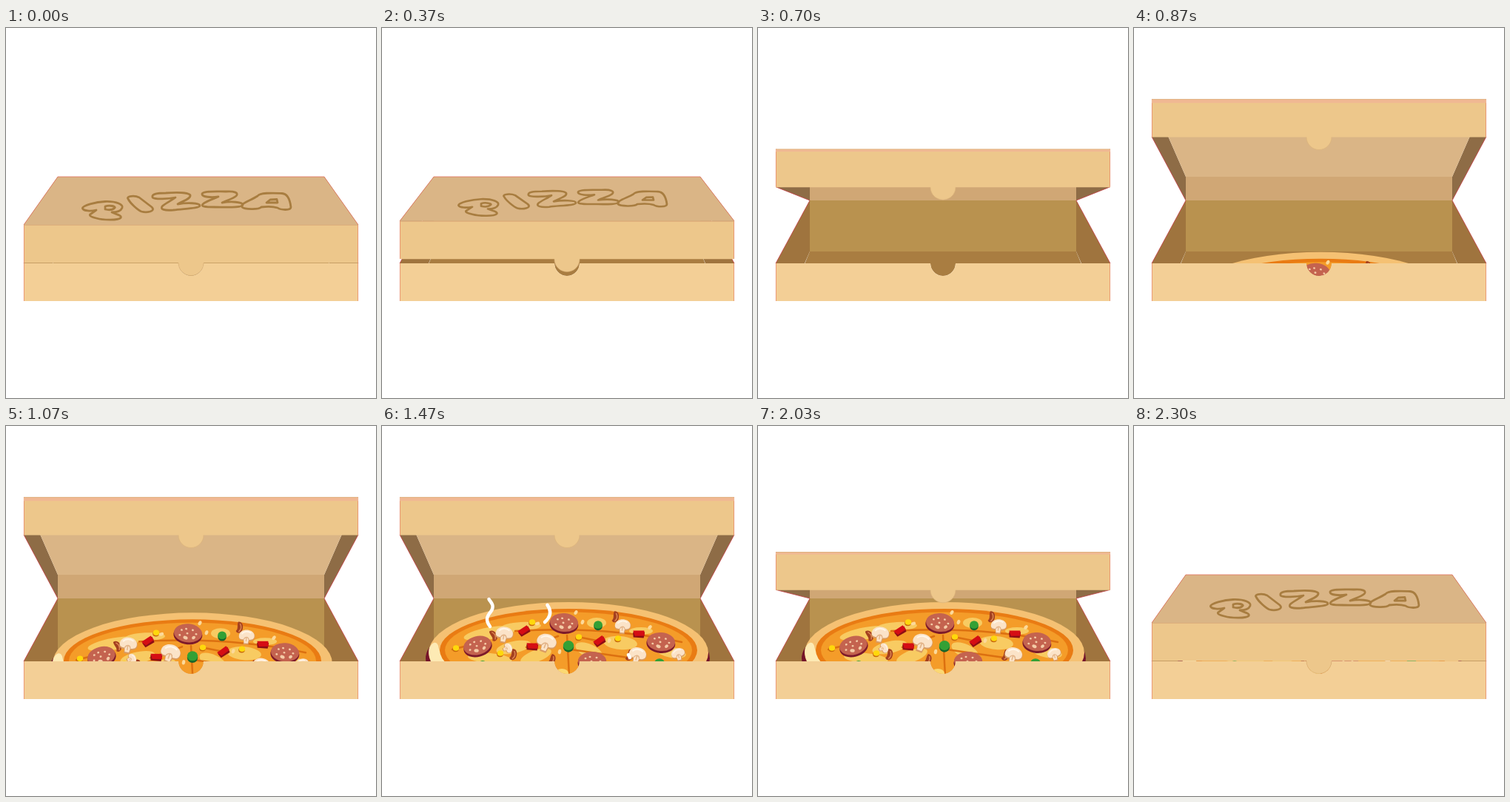
An HTML page for the animation above (2830 ms loop, 500x500 px).

```html
<!DOCTYPE html>
<html lang="en">
<head>
<meta charset="utf-8">
<title>Pizza box</title>
<style>
html, body { margin: 0; width: 100%; height: 100%; overflow: hidden; background: #fff; }
svg { display: block; width: 100vw; height: 100vh; }
</style>
</head>
<body>
<svg id="stage" viewBox="0 0 500 500">
  <defs>
    <clipPath id="inside"><path d="M0 0H500V318H267A17 17 0 0 1 233 318H0Z"/></clipPath>
    <clipPath id="topClip"><path id="topClipPath"/></clipPath>
  </defs>

  <g id="tray">
    <path fill="#b9924f" d="M70 233H430V302H70Z"/>
    <path fill="#a97d41" d="M70 302H430L437 319H63Z"/>
    <path fill="#9f743e" d="M24 318L70 233V302L63 318ZM476 318L430 233V302L437 318Z"/>
    <path fill="none" stroke="#c23a40" stroke-width=".8" d="M24 318L70 233M476 318L430 233"/>
    <path fill="#a97d41" d="M233 317H267V318A17 17 0 0 1 233 318Z"/>
  </g>

  <g clip-path="url(#inside)"><g id="pizza"></g></g>

  <path fill="#f3cf96" d="M24 318H233A17 17 0 0 0 267 318H476V369H24Z"/>
  <path fill="none" stroke="#e8896c" stroke-width=".8" d="M24.4 318V369M475.6 318V369"/>

  <g id="lid">
    <path id="flaps" fill="#8e6c46"/>
    <path id="flapEdges" fill="none" stroke="#c23a40" stroke-width=".8"/>
    <path fill="#d0a775" d="M70 201H430V233H70Z"/>
    <path id="top" fill="#dab586"/>
    <path id="topEdges" fill="none" stroke="#e0705c" stroke-width=".8"/>
    <g clip-path="url(#topClip)">
      <g id="lettering" fill="none" stroke="#a87d40" stroke-width="2.8" stroke-linejoin="round">
        <path d="M103.500 244C102 240 122 235 134 234.500C150 234 159 239 157 243C155 248 148 249 143 249C149 252 157 253 155 256.500C152 260 132 260 122 257C114 255 111 253 115 251L122 246C114 248 105 247 103.500 244ZM134 241C140 239 149 241 147 243C144 246 138 246 134 245Z"/>
        <path d="M165 231C162 227 174 226 180 229L197 242C203 248 190 250 183 248C178 246 168 237 165 231Z"/>
        <path d="M198 229C196 224 205 223 216 223C230 222 247 222 249 226C250 231 238 234 232 238C243 236 262 236 262 240C262 244 240 244 226 246C214 247 208 245 211 241C215 237 224 233 229 229C220 231 201 232 198 229Z"/>
        <path d="M265 224C267 220 284 221 297 221C309 220 315 223 311 227C306 231 298 233 292 236C304 234 320 235 320 239C319 243 300 242 282 242C268 242 263 241 266 238C270 234 280 231 287 228C279 229 264 229 265 224Z"/>
        <path d="M340 227C344 222 360 223 373 223.500C381 224 384 234 385 242C385 247 371 246 367 243C361 241 353 241 345 242C341 246 322 245 319 242C316 237 331 233 340 227ZM357 232L366 231.500L367 236L352 236Z"/>
      </g>
    </g>
    <g id="lidFront">
      <path fill="#edc78b" d="M24 0H476V51.500H267A17 17 0 0 1 233 51.500H24Z"/>
      <path fill="none" stroke="#dcb47a" stroke-width=".7" d="M267 51.500A17 17 0 0 1 233 51.500"/>
      <path fill="none" stroke="#e8896c" stroke-width=".8" d="M24.400 0V51M475.600 0V51"/>
      <path stroke="#d9a577" stroke-width=".8" d="M24 .4H476"/>
      <rect id="rim" x="24" width="452" fill="#f0b893"/>
    </g>
  </g>

  <g id="steam" fill="none" stroke="#fff" stroke-width="4.500" stroke-linecap="round">
    <path pathLength="100" d="M146 271C140 263 141 258 147 251C152 244 149 240 145 235C143 232 144 230 145 229"/>
    <path pathLength="100" d="M220 265C230 256 228 247 222 240C218 235 220 231 222 229"/>
    <path pathLength="100" d="M335 313C329 303 331 298 337 291C344 284 343 279 338 272"/>
  </g>
</svg>
<script>
const LOOP = 2830;
const CLOSED = 266, OPEN = 96, BACK = 201, HINGE = 233, DEPTH = 51;
const $ = id => document.getElementById(id);
const clamp = v => Math.min(1, Math.max(0, v));
const span = (t, start, length) => clamp((t - start) / length);

// Pizza pieces
const ellipse = (x, y, rx, ry, fill, turn = 0) =>
  `<ellipse cx="${x}" cy="${y}" rx="${rx}" ry="${ry}" fill="${fill}" transform="rotate(${turn} ${x} ${y})"/>`;
const place = (x, y, turn, body) => `<g transform="translate(${x} ${y}) rotate(${turn})">${body}</g>`;

const salami = (x, y, turn) => place(x, y, turn,
  ellipse(0, 2, 19.5, 13, "#7d1a2a") + ellipse(0, -.5, 19, 12.5, "#c4634f") +
  [[-9, -4], [-3, -6], [6, -5], [11, 0], [-11, 3], [-1, 0]].map(([a, b]) => ellipse(a, b, 1.5, 1.3, "#f4cba6")).join("") +
  ellipse(-3, 6, 3.2, 2.2, "#f4cba6", 20) + ellipse(8, 5, 2.6, 2, "#f4cba6", -40));

const pepper = (x, y, turn) => place(x, y, turn,
  `<path fill="#8f0d14" d="M-8 -2L8 -3L7 5L-7 5Z"/><path fill="#d50d14" d="M-8 -4L7 -5L8 2L-5 3Z"/>`);

const corn = (x, y) => ellipse(x - .5, y + 1.5, 4.3, 3.8, "#c9690c") + ellipse(x, y, 4.2, 3.8, "#ffd80c");

const olive = (x, y, r) => ellipse(x, y + 1.5, r, r, "#17652a") + ellipse(x, y - .5, r, r * .9, "#33a035");

const mushroom = (x, y, turn, size) => place(x, y, turn, `<g transform="scale(${size})">
  <path fill="#d99b62" d="M-12 2C-13 -10 8 -14 13 -3C15 5 8 7 5 7L4 13H-4L-4 7C-9 8 -12 6 -12 2Z"/>
  <path fill="#fbe3c8" d="M-12 0C-12 -12 8 -14 12 -4C14 4 8 5 4 5L3 11H-3L-4 5C-9 6 -12 4 -12 0Z"/>
  <path fill="none" stroke="#e3b488" stroke-width="1.500" d="M-4 5C-2 0 3 0 4 5M0 1V8"/>
  <path fill="none" stroke="#fff6e8" stroke-width="2" d="M-8 -3C-5 -8 2 -9 7 -6"/></g>`);

const bacon = (x, y, turn) => place(x, y, turn,
  `<path fill="#a4401f" d="M-4 -7C2 -9 5 -2 4 3C3 8 -2 9 -4 6C-1 2 -5 -2 -4 -7Z"/>
   <path fill="none" stroke="#dd8652" stroke-width="1.500" d="M-1 -5C3 -1 2 3 0 6"/>`);

const cheese = (x, y, rx, ry, turn) => ellipse(x, y, rx, ry, "#f8cb62", turn);
const each = (draw, list) => list.map(args => draw(...args)).join("");

$("pizza").innerHTML =
  ellipse(251, 314, 192, 66, "#74142a") +
  ellipse(252, 306.5, 189, 68.5, "#f5c173") +
  `<path fill="#fdeab4" d="M64 300C68 291 74 291 76 297C77 305 82 313 90 322H68C64 314 62 306 64 300Z"/>` +
  ellipse(252, 303, 174, 56, "#e97b13") +
  ellipse(252, 303, 167, 51.5, "#f49c29") +
  each(cheese, [[146, 280, 36, 8, -10], [188, 271, 27, 6, -3], [178, 299, 24, 8, -12], [322, 293, 23, 9, 5],
    [290, 266, 13, 7, 0], [208, 311, 22, 8, -20], [280, 304, 20, 9, 25], [350, 277, 16, 5, 0], [391, 306, 20, 7, 10], [146, 314, 30, 7, 5]]) +
  `<path fill="none" stroke="#dc7010" stroke-width="2.500" stroke-linecap="round"
    d="M95 302L135 292M180 277Q300 270 405 292M250 283L253 338M195 299L238 284M255 302L340 314M270 286L300 292"/>` +
  ellipse(243, 334, 9, 6, "#fbd873") +
  each(bacon, [[151, 283, -20], [316, 258, 15], [178, 309, 20], [335, 310, 25], [230, 316, 30]]) +
  each(mushroom, [[222, 292, 20, 1.08], [165, 281, 10, .95], [325, 270, 5, .85], [345, 309, 15, .95], [400, 308, -15, .75], [170, 300, 70, .55]]) +
  each(salami, [[246, 266, 5], [129, 297, -14], [377, 292, 5], [284, 318, 0]]) +
  each(pepper, [[192, 277, -30], [203, 298, 5], [294, 291, -32], [347, 281, 4]]) +
  each(corn, [[203, 265], [100, 300], [266, 285], [319, 287], [160, 307]]) +
  each(olive, [[292, 269, 5.8], [252, 297, 7.2], [375, 321, 7], [136, 323, 6]]) +
  each((x, y, turn) => ellipse(x, y, 2.2, 3.2, "#fcd99a", turn),
    [[262, 252, 30], [271, 265, 20], [362, 272, 40], [307, 290, 20], [210, 267, 70], [240, 305, 10]]);

function lidTop(t) {
  const opened = t < 300 ? 0 : span(t, 238, 572) ** 2.4;
  const closing = (1 - Math.cos(Math.PI * span(t, 1867, 433) ** .8)) / 2;
  return CLOSED + (OPEN - CLOSED) * opened * (1 - closing);
}

function drawLid(y) {
  const low = y + DEPTH, tilt = (y - BACK) / (CLOSED - BACK);
  const top = `M24 ${y}L70 ${BACK}H430L476 ${y}Z`;
  $("flaps").setAttribute("d",
    `M24 ${y}L70 ${BACK}V${HINGE}L24 ${low}ZM476 ${y}L430 ${BACK}V${HINGE}L476 ${low}Z`);
  $("flapEdges").setAttribute("d", low < HINGE ? `M24 ${low}L70 ${HINGE}M476 ${low}L430 ${HINGE}` : "");
  $("top").setAttribute("d", top);
  $("topClipPath").setAttribute("d", top);
  $("topEdges").setAttribute("d", tilt > 0 ? `M24 ${y}L70 ${BACK}H430L476 ${y}` : "");

  const squash = Math.max(.01, (tilt - .08) / .92);
  const shift = BACK + 17 * (tilt - .3) / .7 - 218 * squash;
  $("lettering").setAttribute("transform", `matrix(1 0 0 ${squash} 0 ${shift})`);
  $("lettering").setAttribute("visibility", tilt > .02 ? "visible" : "hidden");

  $("lidFront").setAttribute("transform", `translate(0 ${y})`);
  $("rim").setAttribute("y", .8);
  $("rim").setAttribute("height", tilt < 0 ? Math.min(4.5, 1 - tilt * 3) : 0);
}

const wisps = [...$("steam").children];
const wispStarts = [1340, 1390, 1462];

function drawWisp(path, t, start) {
  const head = 100 * (1 - (1 - span(t, start, 200)) ** 2);
  const tail = 100 * span(t, start + 220, 185) ** 1.5;
  const length = head - tail;
  path.setAttribute("visibility", length > .1 ? "visible" : "hidden");
  path.setAttribute("stroke-dasharray", `${Math.max(.1, length)} 300`);
  path.setAttribute("stroke-dashoffset", -tail);
}

function render(t) {
  drawLid(lidTop(t));
  const drop = 100 * (1 - span(t, 792, 585)) ** 3;
  $("pizza").setAttribute("transform", `translate(0 ${drop})`);
  $("pizza").setAttribute("visibility", t > 792 ? "visible" : "hidden");
  wisps.forEach((path, i) => drawWisp(path, t, wispStarts[i]));
}

const began = performance.now();
function tick() {
  render((performance.now() - began) % LOOP);
  requestAnimationFrame(tick);
}
tick();
</script>
</body>
</html>
```
